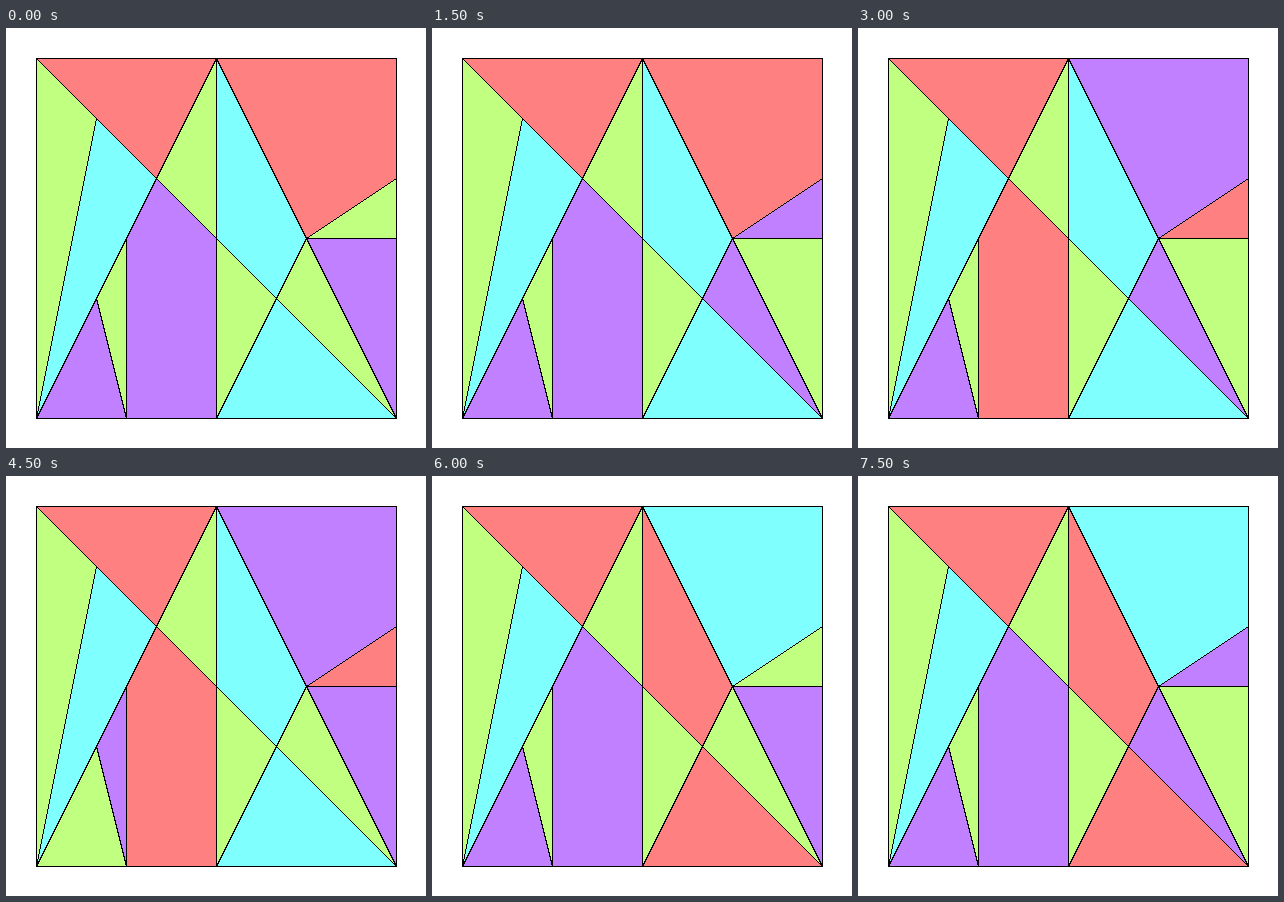
Write an HTML page that moves like this. It is 420 px wide and 420 px high and loops after 8000 ms.

```html
<!DOCTYPE html>
<html lang="en">
<head>
<meta charset="utf-8">
<title>Fourteen-piece square</title>
<style>
  html, body { margin: 0; width: 100%; height: 100%; overflow: hidden; background: #fff; }
  svg { display: block; width: 100vw; height: 100vh; }
  polygon { stroke: #000; stroke-width: 1; stroke-linejoin: round; shape-rendering: crispEdges; }
</style>
</head>
<body>
<svg id="stage" viewBox="0 0 420 420"></svg>
<script>
const LOOP = 8000, STEP = 1500, UNIT = 30, ORIGIN = 30.5;
const COLORS = { r: '#ff8080', g: '#c0ff80', c: '#80ffff', p: '#c080ff' };

// Corners on a 12 by 12 grid
const PIECES = [
  '0,0 2,2 0,12',
  '0,0 6,0 4,4',
  '2,2 4,4 0,12',
  '6,0 6,6 4,4',
  '4,4 6,6 6,12 3,12 3,6',
  '3,6 3,12 2,8',
  '2,8 3,12 0,12',
  '6,6 8,8 6,12',
  '8,8 12,12 6,12',
  '6,0 9,6 8,8 6,6',
  '6,0 12,0 12,4 9,6',
  '12,4 12,6 9,6',
  '9,6 12,6 12,12',
  '9,6 12,12 8,8'
];

// One colour letter per piece
const COLORINGS = [
  'grcgpgpgccrgpg',
  'grcgpgpgccrpgp',
  'grcgrgpgccprgp',
  'grcgrpggccprpg',
  'grcgpgpgrrcgpg',
  'grcgpgpgrrcpgp'
];

const stage = document.getElementById('stage');
const shapes = PIECES.map(corners => {
  const shape = document.createElementNS('http://www.w3.org/2000/svg', 'polygon');
  shape.setAttribute('points', corners.replace(/\d+/g, n => ORIGIN + n * UNIT));
  return stage.appendChild(shape);
});

let current = -1;
function render(time) {
  const index = Math.floor((time % LOOP) / STEP);
  if (index === current) return;
  current = index;
  shapes.forEach((shape, i) => shape.setAttribute('fill', COLORS[COLORINGS[index][i]]));
}

const start = performance.now();
function tick() {
  render(performance.now() - start);
  requestAnimationFrame(tick);
}
tick();
</script>
</body>
</html>
```
